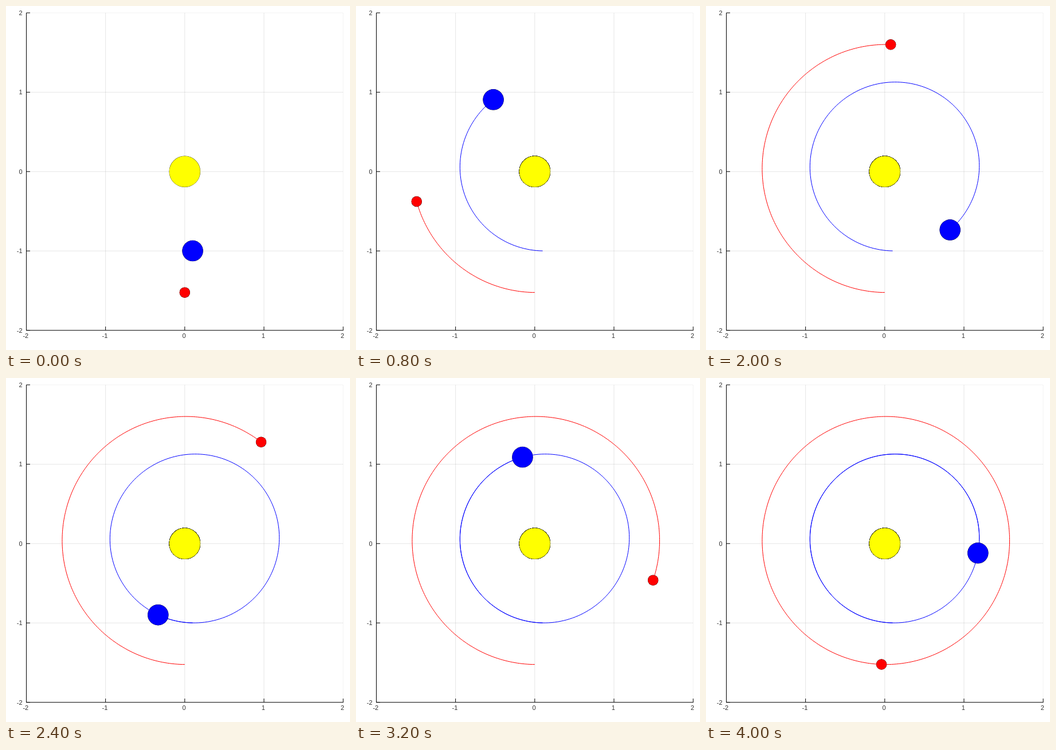
Animation of 600x600 px, one loop 4050 ms. Source, as an HTML page with a canvas:

```html
<!DOCTYPE html>
<html lang="en">
<head>
<meta charset="utf-8">
<title>Two orbits</title>
<style>
  html, body { margin: 0; width: 100%; height: 100%; overflow: hidden; background: #fff; }
  svg, canvas { position: absolute; left: 0; top: 0; width: 600px; height: 600px; }
  .grid { stroke: #000; stroke-opacity: .1; }
  .edge { stroke-opacity: .05; }
  .axis { stroke: #000; }
  text { font: 11px "Liberation Sans", Arial, sans-serif; fill: #333; }
</style>
</head>
<body>
<svg id="axes" viewBox="0 0 600 600"></svg>
<canvas id="sky" width="600" height="600"></canvas>
<script>
const STEP = 50, STEPS = 81, RAD = Math.PI / 180;
const px = x => 311.8 + 138.15 * x;
const py = y => 288.8 - 138.42 * y;

// Angles in degrees; rate is the mean motion per step, clockwise.
const planets = [
  { color: '#00f', size: 18, a: 1.071, e: 0.131, peri: 207.3, phase: -54.96, rate: 7.962 },
  { color: '#f00', size: 9, a: 1.5625, e: 0.0266, peri: 250.1, phase: -18.88, rate: 4.5185 }
];

function position(p, step) {
  const M = (p.phase + p.rate * step) * RAD;
  let E = M;
  for (let i = 0; i < 6; i++) E -= (E - p.e * Math.sin(E) - M) / (1 - p.e * Math.cos(E));
  const u = p.a * (Math.cos(E) - p.e);
  const v = -p.a * Math.sqrt(1 - p.e * p.e) * Math.sin(E);
  const c = Math.cos(p.peri * RAD), s = Math.sin(p.peri * RAD);
  return [px(u * c - v * s), py(u * s + v * c)];
}

function drawAxes() {
  const line = (cls, x1, y1, x2, y2) =>
    `<line class="${cls}" x1="${x1}" y1="${y1}" x2="${x2}" y2="${y2}"/>`;
  const label = (x, y, anchor, n) =>
    `<text x="${x}" y="${y}" text-anchor="${anchor}">${n}</text>`;
  const left = 35.5, right = 588, top = 12, bottom = 565.7;
  let grid = '', axis = '', labels = '';
  for (let n = -2; n <= 2; n++) {
    const x = px(n), y = py(n);
    const cls = n === 2 ? 'grid edge' : 'grid';
    if (n > -2) {
      grid += line(cls, x, top, x, bottom) + line(cls, left, y, right, y);
    }
    axis += line('axis', x, bottom, x, bottom - 6.5) + line('axis', left, y, left + 6.5, y);
    labels += label(x - 1.2, 579, 'middle', n) + label(28.5, y + 4, 'end', n);
  }
  axis += line('axis', left, top, left, bottom + .4) + line('axis', left, bottom, right + .4, bottom);
  document.getElementById('axes').innerHTML = grid + axis + labels;
}

const ctx = document.getElementById('sky').getContext('2d');

function disc(x, y, r, color) {
  ctx.fillStyle = color;
  ctx.beginPath();
  ctx.arc(x, y, r, 0, 2 * Math.PI);
  ctx.fill();
}

function body(x, y, r, color) {
  disc(x, y, r + .25, '#000');
  disc(x, y, r, color);
}

function trail(p, steps) {
  ctx.strokeStyle = p.color;
  ctx.lineWidth = 1;
  ctx.beginPath();
  for (let i = 0; i <= steps * 4; i++) ctx.lineTo(...position(p, i / 4));
  ctx.stroke();
}

function draw(step) {
  ctx.clearRect(0, 0, 600, 600);
  // The sun is stamped once per step, so its rim hardens early on.
  for (let i = 0; i <= Math.min(step, 20); i++) body(px(0), py(0), 27, '#ff0');
  for (const p of planets) trail(p, step);
  for (const p of planets) body(...position(p, step), p.size, p.color);
}

const start = performance.now();
let shown = -1;
function tick() {
  const step = Math.floor((performance.now() - start) / STEP) % STEPS;
  if (step !== shown) draw(shown = step);
  requestAnimationFrame(tick);
}

drawAxes();
tick();
</script>
</body>
</html>
```
